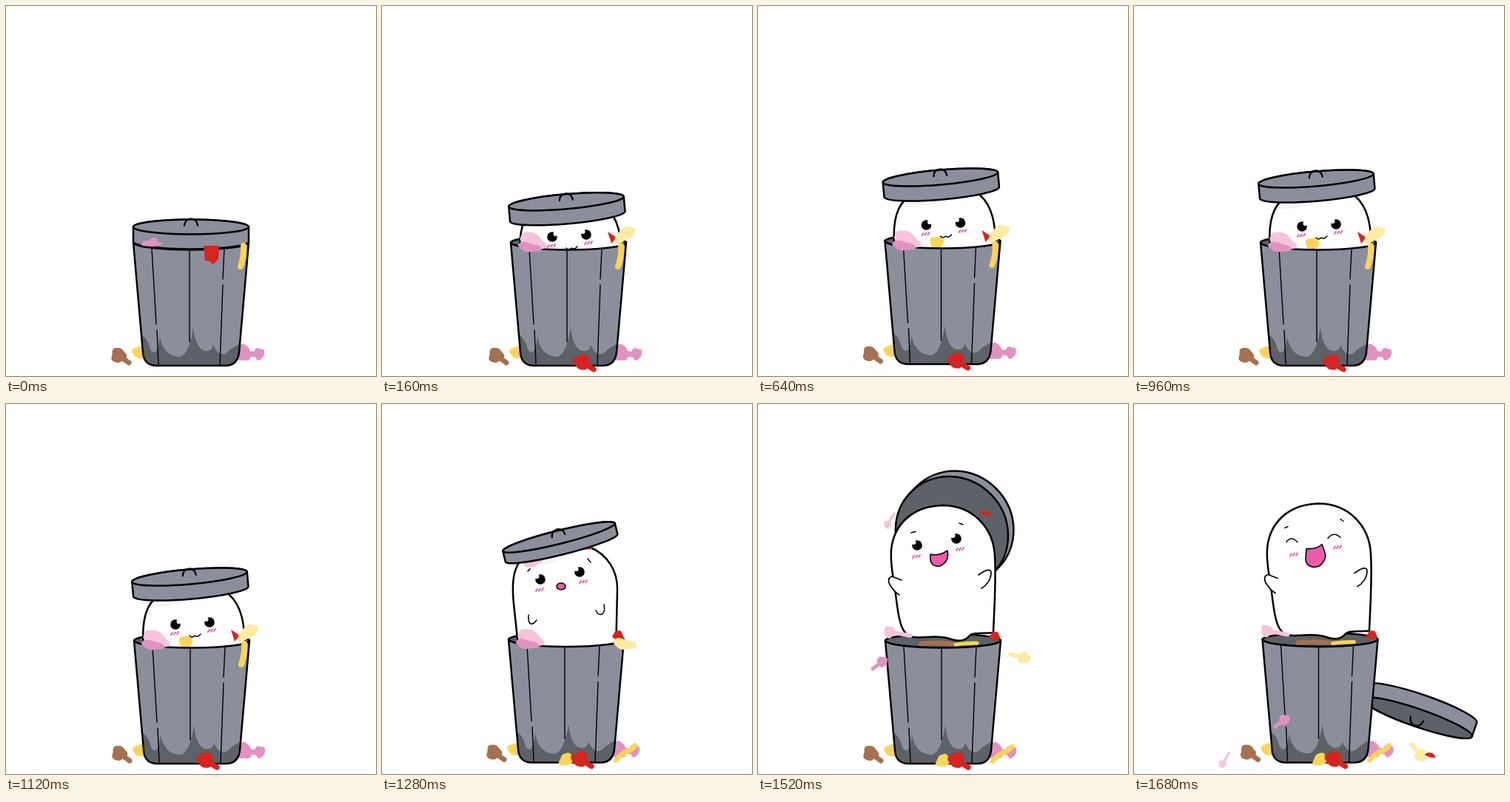
An HTML page that plays this animation: 500x500 px, repeating every 1.92 s.

```html
<!DOCTYPE html>
<html lang="en">
<head>
<meta charset="utf-8">
<title>Ghost in a bin</title>
<style>
  html, body { margin: 0; width: 100%; height: 100%; overflow: hidden; background: #fff; }
  svg { display: block; width: 100%; height: 100%; }
</style>
</head>
<body>
<svg id="stage" viewBox="0 0 500 500" stroke-linecap="round" stroke-linejoin="round"></svg>
<script>
const LOOP = 1920, BURST = 1440, STEP = 80;
const GREY = '#8a8f9b', DARK = '#5d6168', PINK = '#e192c0', PALE_PINK = '#f5c3dc', YELLOW = '#fdd454',
      CREAM = '#faeca2', BROWN = '#a5714e', RED = '#d8231e', BLUSH = '#ea5ba8', SHADE = '#f5f5f7';

const path = (d, fill = 'none', width = 2.5, stroke = '#000') =>
  `<path d="${d}" fill="${fill}" stroke="${stroke}" stroke-width="${width}"/>`;
const line = (d, width = 1.5) => path(d, 'none', width);
const smear = (color, d, width) => path(d, 'none', width, color);
const flat = (d, fill) => path(d, fill, 0, 'none');
const group = (x, y, content, turn = 0) =>
  `<g transform="translate(${x} ${y}) rotate(${turn})">${content}</g>`;
const mix = (from, to, p) => from.map((v, i) => v + (to[i] - v) * p);

// Litter: a lumpy spot, and a spot with a tail reaching to (dx, dy).
function blot(color, x, y, rx, ry = rx, turn = 0) {
  const points = Array.from({ length: 36 }, (_, i) => {
    const a = i * Math.PI / 18, r = 1 + .1 * Math.sin(3 * a + x) + .05 * Math.sin(5 * a + y);
    return `${rx * r * Math.cos(a)},${ry * r * Math.sin(a)}`;
  });
  return group(x, y, flat(`M${points.join('L')}Z`, color), turn);
}
const scrap = (color, x, y, r, dx, dy) =>
  blot(color, x, y, r) + smear(color, `M${x} ${y}l${dx} ${dy}`, r * .7);

const groundLitter = scrap(BROWN, 152, 472, 10, 14, 10) + blot(YELLOW, 180, 468, 9, 8) +
  scrap(PINK, 320, 469, 11, 18, 2) + blot(PINK, 342, 470, 7, 8);
const groundRed = scrap(RED, 268, 481, 10.5, 16, 10);
const extraYellow = blot(YELLOW, 250, 482, 10, 8, -30) +
  smear(YELLOW, 'M317 483Q326 472 332 471T343 463', 6.5);
const lidPink = blot(PINK, 196, 321, 14, 4) + blot(PINK, 199, 319, 6);
const drip = smear(YELLOW, 'M321 324Q322 338 317 352', 8);
const hangingRed = flat('M267 324H288L287 342L280 349L275 345L269 344Z', RED);
const pinkSplat = blot(PALE_PINK, 202, 317, 19, 9, 25) + blot(PINK, 197, 326, 16, 6, 10);
const rimRed = blot(RED, 320, 314, 7, 6);
const rimPalePink = scrap(PALE_PINK, 178, 308, 8, 28, 5);
const insideLitter = smear(BROWN, 'M220 324Q240 322 262 324', 6) + smear(YELLOW, 'M267 325Q280 323 296 323', 5);

// Bin and lid
const wall = 'L315 468Q313 485 298 486H202Q186 485 185 468';
const rim = 'M172 319.500A78 10 0 0 0 328 319.500';
const binBack = path('M172 319.500A78 9 0 0 1 328 319.500A78 10 0 0 1 172 319.500Z', DARK);
const binFront = flat(rim + wall + 'Z', GREY) +
  flat('M183 444Q192 450 195 464Q204 478 208 447Q213 474 235 474Q248 470 253 434' +
    'Q256 462 268 466Q278 468 280 458Q290 480 303 464L316 456' + wall + 'Z', DARK) +
  line('M197 328L203 430M204 438L206 484M248 330V454M295 328L293 369M293 377L289 485', 1.4) +
  path(rim + wall + 'Z');

const lid = (x, y, turn = 0, depth = 20, ry = 10, face = GREY) => group(x, y,
  path(`M-78 0A78 ${ry} 0 0 1 78 0V${depth}A78 ${ry} 0 0 1 -78 ${depth}Z`, GREY) +
  path(`M-78 0A78 ${ry} 0 0 1 78 0A78 ${ry} 0 0 1 -78 0Z`, face) +
  line('M-9 -2C-8 -14 8 -14 9 -2', 2.3), turn);

// Ghost
const dot = (x, y, r, fill = '#000') => `<circle cx="${x}" cy="${y}" r="${r}" fill="${fill}"/>`;
const eye = (x, y, side = -1) => dot(x, y, 6.8) + dot(x + side * 4.5, y - 4, 3, '#fff');
const cheek = (x, y) => path(`M${x + 2} ${y}l-2 3m6 -3.5l-2 3m6 -3.5l-2 3`, 'none', 2, BLUSH);

const peekHead =
  path('M186 336C181 298 187 276 199 264C225 238 275 236 300 257C317 272 322 295 322 336Z', '#fff') +
  flat('M201 264Q250 230 299 258Q270 258 245 267Q215 275 195 275Z', SHADE) +
  eye(228, 298, 1) + eye(274, 295) + line('M247 313q3 4 7 0q4 3 8 -2') +
  cheek(222, 309) + cheek(272, 305) + blot(YELLOW, 242, 322, 9);

const risingGhost =
  path('M185 336L178 270C174 232 180 212 200 200C225 185 262 184 280 193C306 204 318 226 318 250L316 336Z', '#fff') +
  flat('M216 209L268 194Q245 213 212 219Z', SHADE) +
  blot(PALE_PINK, 203, 214, 13, 6, -10) + blot(RED, 276, 193, 8, 4) +
  eye(214, 237) + eye(267, 227) +
  line('M197 226l3 -3.500M278 209l4 5M198 285C197 298 202 301 209 292M289 279C293 289 303 285 300 271') +
  path('M236 246.500a6 4.500 0 1 1 12 0a6 4.500 0 1 1 -12 0', BLUSH, 1.5) +
  cheek(208, 250) + cheek(267, 239);

const ghostBody =
  path('M199 309C190 300 188 270 185 250C181 225 178 206 181 190C188 156 215 138 249 137' +
    'C290 137 318 167 320 205C322 240 319 280 318 309C300 311 292 308 286 313' +
    'C278 323 266 320 255 316C236 312 224 317 210 315Q203 314 199 309Z', '#fff');
const arms =
  path('M194 238L181 233Q174 235 178 244Q184 254 191 258', '#fff', 1.7) +
  path('M298 231C306 225 315 221 315 228C315 238 308 246 302 249', '#fff', 1.7);
const cheerFace = arms + eye(215, 191) + eye(268, 182) + line('M207 174l6 -1.500M272 161l5 2') +
  path('M233 203Q245 206 256 198Q259 213 246 219Q231 221 233 203Z', BLUSH, 1.6) +
  cheek(209, 205) + cheek(268, 195);
const laughFace = arms + line('M206 189Q212 180 221 189M262 184Q270 174 279 183M204 170l4 -2M279 158l4 3') +
  path('M233 198Q247 199 254 192Q258 202 259 208Q255 223 243 223Q231 221 232 210Z', BLUSH, 1.6) +
  cheek(211, 205) + cheek(270, 195);

// Scenes
const bin = (inside, outside) => groundLitter + binBack + inside + binFront + outside;
const closed = extra => bin('', lid(250, 298.5) + lidPink + drip + extra);
const peeking = drop => bin(group(0, drop, peekHead) + lid(247, 233.5 + drop * 2.2, -5),
  pinkSplat + flat('M303 305L315 313L308 321Z', RED) + drip + blot(CREAM, 326, 309, 16, 8, -35) + groundRed);

const tiltedLid = [240, 181.5, -14, 15, 9], flungLid = [262, 174, -135, 10.5, 74], landedLid = [381.5, 425.5, -161, 20, 12];
const rising = bin(group(1, 1.5, risingGhost) + lid(...tiltedLid),
  pinkSplat + rimRed + blot(CREAM, 329, 326, 16, 7, 10) + extraYellow + groundRed);

// Each scrap is thrown from the ghost to a high point, then drops to its landing place.
const launch = [250, 230];
const throws = [
  { art: scrap(PALE_PINK, -4, 6, 5, 9, -15), high: [179, 157], land: [122, 482] },
  { art: scrap(PINK, 3, -1, 7, -13, 10), high: [165, 349], land: [199, 429] },
  { art: scrap(CREAM, 7, 2, 8, -19, -5), high: [353, 341], land: [382, 471], turn: 35 },
  { art: blot(RED, 0, 0, 7, 3, 15), high: [308, 148], land: [399, 476] }
];

function burst(time) {
  const step = Math.floor((time - BURST) / STEP);
  const open = Math.min(1, (step + 1) / 2), fall = Math.max(0, (step - 1) / 2);
  const tween = (from, middle, to) => mix(mix(from, middle, open), to, fall);
  const flying = throws.map(({ art, high, land, turn = 0 }) =>
    group(...tween(launch, high, land), art, turn * fall)).join('');
  const ghost = group(-1.5 * fall, 28 * (1 - open) - fall, ghostBody + (fall ? laughFace : cheerFace));
  return group(1.5 * fall, -1.5 * fall, lid(...tween(tiltedLid, flungLid, landedLid), DARK) +
    bin(insideLitter + ghost, rimPalePink + rimRed + extraYellow + groundRed + flying));
}

// Start time, sway of the whole drawing, scene
const timeline = [
  [0, 0, 0, () => closed(hangingRed)],
  [160, 2, 0, () => peeking(14)],
  [400, 0, -1.5, () => closed(groundRed)],
  [640, -.5, -2, () => peeking(0)],
  [800, -1, 0, () => peeking(0)],
  [1120, 1, 0, () => peeking(0)],
  [1280, -1, -1.5, () => rising],
  [BURST, 0, 0, burst]
];

const stage = document.getElementById('stage');
let shown;
function tick() {
  const time = Math.floor(performance.now() % LOOP / STEP) * STEP;
  if (time !== shown) {
    const [, x, y, scene] = timeline.findLast(([start]) => start <= time);
    stage.innerHTML = group(x, y, scene(Math.min(time, BURST + 3 * STEP)));
    shown = time;
  }
  requestAnimationFrame(tick);
}
tick();
</script>
</body>
</html>
```
